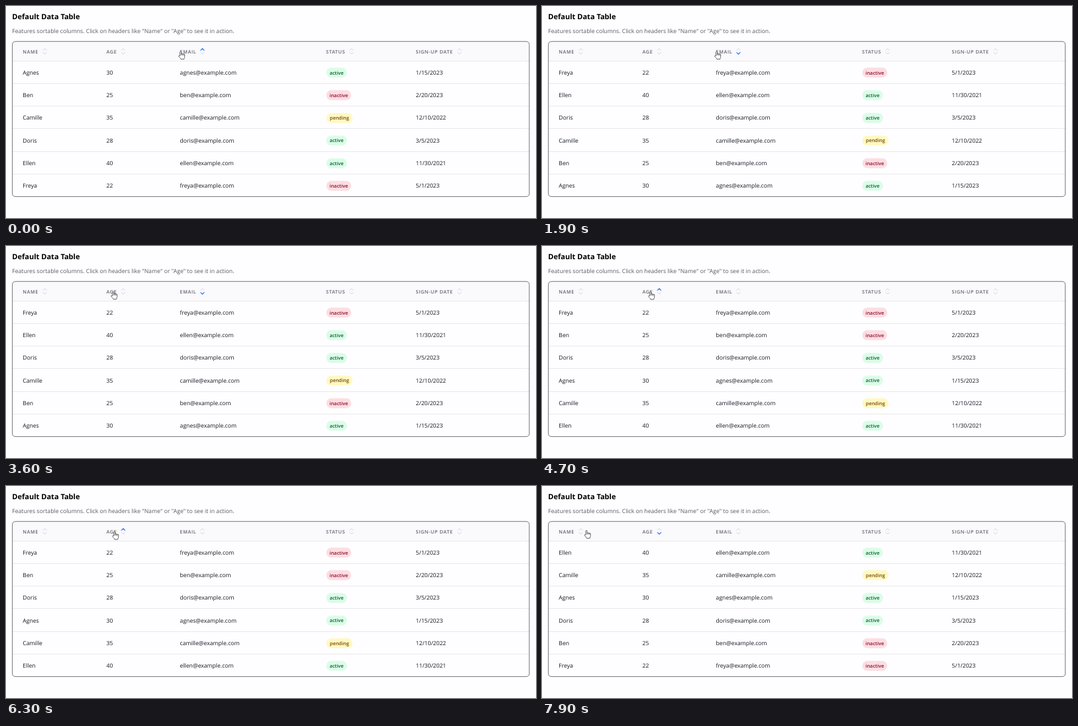
An HTML page for the animation above (8000 ms loop, 800 by 321 pixels).

```html
<!DOCTYPE html>
<html lang="en">
<head>
<meta charset="utf-8">
<title>Default Data Table</title>
<style>
  html, body { margin: 0; width: 100%; height: 100%; overflow: hidden; background: #fefdff; }
  svg { display: block; width: 800px; height: 321px; }
  text { font: 8.62px "Open Sans", "Noto Sans", sans-serif; fill: #141a22; text-rendering: geometricPrecision; }
  .title { font-size: 11.05px; font-weight: 700; fill: #000; }
  .sub { font-size: 8.69px; fill: #565a62; }
  .head { font-size: 7.25px; font-weight: 600; letter-spacing: .6px; fill: #64676f; }
  .pill { font-size: 7.4px; font-weight: 600; text-anchor: middle; }
  .chevron { fill: none; stroke-linecap: round; stroke-linejoin: round; }
</style>
</head>
<body>
<svg id="stage" viewBox="0 0 800 321"></svg>
<script>
const LOOP = 8000, STEP = 100;
const columns = [
  { label: "NAME", x: 25.3, icon: 58.5 },
  { label: "AGE", x: 151.6, icon: 177 },
  { label: "EMAIL", x: 262.6, icon: 296.5 },
  { label: "STATUS", x: 483.1, icon: 521.5 },
  { label: "SIGN-UP DATE", x: 618.6, icon: 684.5 }
];
const people = [
  ["Agnes", 30, "active", "1/15/2023"],
  ["Ben", 25, "inactive", "2/20/2023"],
  ["Camille", 35, "pending", "12/10/2022"],
  ["Doris", 28, "active", "3/5/2023"],
  ["Ellen", 40, "active", "11/30/2021"],
  ["Freya", 22, "inactive", "5/1/2023"]
].map(([name, age, status, date]) =>
  [name, age, name.toLowerCase() + "@example.com", status, date]);
const badges = {
  active: { width: 31, fill: "#dafde7", ink: "#125f33" },
  inactive: { width: 37.6, fill: "#fcdee2", ink: "#8c0f30" },
  pending: { width: 39.6, fill: "#fff9c2", ink: "#7a480c" }
};
// Sort state from each time on: column and direction
const sorts = [[0, 2, 1], [500, 2, -1], [4100, 1, 1], [6800, 1, -1]];
// Pointer stops: time, x, y of the fingertip
const stops = [
  [0, 263.7, 68.8], [2800, 263.7, 68.8], [3500, 161.7, 68.8], [4100, 161.7, 68.8],
  [4400, 163.7, 69.1], [7300, 163.7, 69.1], [7800, 67.2, 67.4], [LOOP, 67.2, 67.4]
];
const stage = document.getElementById("stage");

const text = (x, y, value, cls = "", extra = "") =>
  `<text x="${x}" y="${y}" class="${cls}" ${extra}>${value}</text>`;

const chevron = (x, y, dir, on) =>
  `<path class="chevron" d="M${x - 2.6} ${y}l2.6 ${-2.6 * dir}l2.6 ${2.6 * dir}"
    stroke="${on ? "#2f74ea" : "#d0d2d7"}" stroke-width="${on ? 1.15 : .9}"/>`;

function badge(status, x, y) {
  const { width, fill, ink } = badges[status];
  return `<rect x="${x + .4}" y="${y - 7.3}" width="${width}" height="15" rx="7.5" fill="${fill}"/>` +
    text(x + .4 + width / 2, y + 2.9, status, "pill", `style="fill:${ink}"`);
}

function table(key, dir) {
  const rows = [...people].sort((a, b) => (a[key] < b[key] ? -1 : 1) * dir);
  let out = text(9.3, 20, "Default Data Table", "title") +
    text(9.2, 40.5, 'Features sortable columns. Click on headers like "Name" or "Age" to see it in action.', "sub") +
    `<path d="M10 83V58a4 4 0 0 1 4-4H786a4 4 0 0 1 4 4V83Z" fill="#faf9fc"/>`;
  columns.forEach(({ label, x, icon }, c) => {
    out += text(x, 71.6, label, "head") +
      chevron(icon, 67, 1, c === key && dir > 0) +
      chevron(icon, 70.4, -1, c === key && dir < 0);
  });
  rows.forEach((row, r) => {
    const y = 100.6 + 34.3 * r;
    out += `<path d="M10 ${Math.round(y - 18.05) + .5}H790" stroke="#e9e8ec"/>`;
    row.forEach((value, c) => {
      const { x } = columns[c];
      out += c === 3 ? badge(value, x, y) : text(x, y + 3.1, value);
    });
  });
  return out + '<rect x="9.6" y="53.7" width="780.3" height="234.9" rx="4.5" fill="none" stroke="#505056" stroke-width=".8"/>';
}

function pointer(t) {
  const i = stops.findIndex(s => s[0] > t);
  const [t0, x0, y0] = stops[i - 1], [t1, x1, y1] = stops[i];
  const u = (t - t0) / (t1 - t0), k = u * u * (3 - 2 * u);
  return `<path transform="translate(${x0 + (x1 - x0) * k} ${y0 + (y1 - y0) * k})"
    d="M-1.1 6.5V.9a1 1 0 0 1 2 0V4l.2-.1a.9.9 0 0 1 1.7.3a.9.9 0 0 1 1.7.3a.8.8 0 0 1 1.5.6V8c0 1.2-.9 2-1 3.8H.3C.2 10.3-2.2 8.8-2.9 7.4C-3.3 6.2-2 5.6-1.1 6.8Z
    M.9 4V6M2.8 4.2V6M4.5 4.5V6" fill="#fff" stroke="#3c3c42" stroke-width=".8" stroke-linejoin="round"/>`;
}

function draw(now) {
  const t = Math.floor(now % LOOP / STEP) * STEP;
  const [, key, dir] = sorts.filter(s => s[0] <= t).pop();
  stage.innerHTML = table(key, dir) + pointer(t);
  requestAnimationFrame(draw);
}
draw(performance.now());
</script>
</body>
</html>
```
